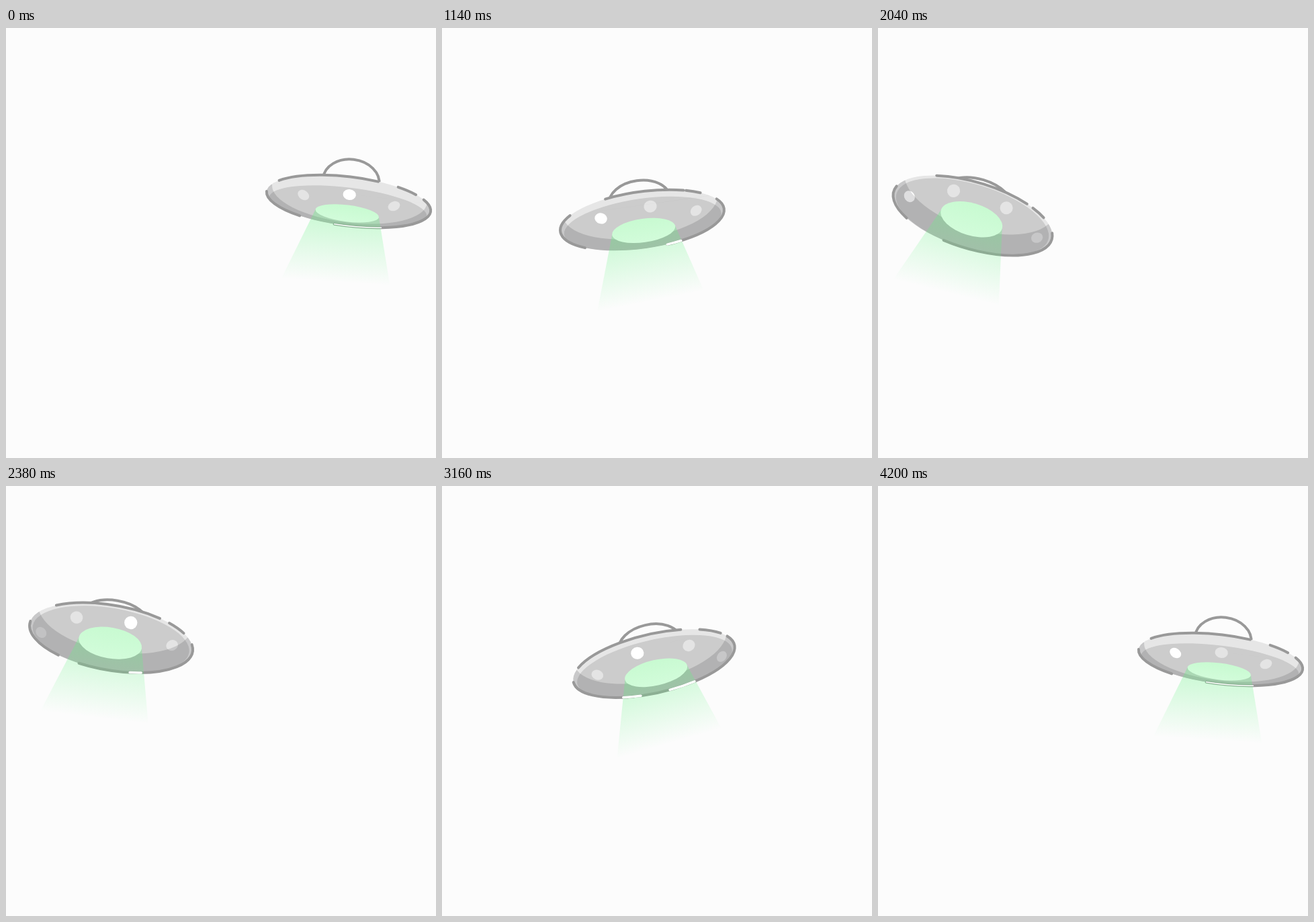
Recreate the animation shown at these times as an HTML page with a canvas. Size 640 px wide and 640 px high, loop 4220 ms.

```html
<!DOCTYPE html>
<html lang="en">
<head>
<meta charset="utf-8">
<title>Flying saucer</title>
<style>
html, body { margin: 0; width: 100%; height: 100%; overflow: hidden; background: #fcfcfc; }
canvas { display: block; width: 640px; height: 640px; }
</style>
</head>
<body>
<canvas id="stage" width="640" height="640"></canvas>
<script>
const ctx = document.getElementById('stage').getContext('2d');
const LOOP = 4220, PERIOD = 4200;   // the last frame rests on the first pose
const RX = 123, TAU = Math.PI * 2, RAD = Math.PI / 180;

// time, x, y, roll in degrees
const PATH = [
  [0, 510, 258, 7],
  [440, 428.5, 212.5, -2.5],
  [540, 408, 213, -4],
  [1080, 308, 277, -8],
  [1140, 298, 286, -8],
  [1400, 249, 310, -5],
  [1620, 208, 310, 2],
  [2040, 141, 279, 17],
  [2160, 132.5, 257, 14.5],
  [2700, 232, 211.5, 3],
  [2760, 243.5, 214.5, 1.7],
  [3240, 330, 274, -15],
  [3560, 390, 307, -18],
  [3780, 437, 304, -7]
];

// time, pitch, then rim angles: top line, short line, right line, left line, glint end
const SHAPE = [
  [0, 0, 210, 289, 305, 323, -26, 98, 124.5, 180, 98],
  [440, 0.15, 225, 294, 305, 321, -26, 89, 129, 197, 89],
  [1140, 0.45, 246, 303, 305, 318, -22, 75, 137, 211, 75],
  [2040, 1, 236, 306, 312, 326, -11, 104.5, 139, 190, 64.5],
  [2760, 0.73, 210.5, 298, 310, 331, -16, 112, 112, 180, 83.5],
  [3560, 0.38, 205, 291, 308, 328, -24, 112, 112, 180, 83]
];

const clamp = v => Math.max(0, Math.min(1, v));

// periodic cubic through the rows, one value per column
function sample(rows, time) {
  const n = rows.length, t = time % PERIOD;
  const at = i => {
    const turn = Math.floor(i / n), row = rows[i - turn * n];
    return { t: row[0] + turn * PERIOD, row };
  };
  let i = n - 1;
  while (rows[i][0] > t) i--;
  const [a, b, c, d] = [at(i - 1), at(i), at(i + 1), at(i + 2)];
  const h0 = b.t - a.t, h1 = c.t - b.t, h2 = d.t - c.t, u = (t - b.t) / h1;
  return b.row.slice(1).map((p, k) => {
    const q = c.row[k + 1];
    const s0 = (p - a.row[k + 1]) / h0, s1 = (q - p) / h1, s2 = (d.row[k + 1] - q) / h2;
    const m0 = (s0 * h1 + s1 * h0) / (h0 + h1) * h1;
    const m1 = (s1 * h2 + s2 * h1) / (h1 + h2) * h1;
    const u2 = u * u, u3 = u2 * u;
    return p * (2 * u3 - 3 * u2 + 1) + m0 * (u3 - 2 * u2 + u) +
           q * (3 * u2 - 2 * u3) + m1 * (u3 - u2);
  });
}

function oval(x, y, rx, ry, fill, tilt = 0) {
  ctx.beginPath();
  ctx.ellipse(x, y, rx, ry, tilt, 0, TAU);
  ctx.fillStyle = fill;
  ctx.fill();
}

function rimLine(from, to, ry, color, width) {
  if (to <= from) return;
  ctx.beginPath();
  ctx.ellipse(0, 0, RX, ry, 0, from * RAD, to * RAD);
  ctx.strokeStyle = color;
  ctx.lineWidth = width;
  ctx.stroke();
}

function drawDome(q, ry) {
  ctx.save();
  // only the part above the hull shows
  ctx.beginPath();
  ctx.rect(-200, -200, 400, 400);
  ctx.ellipse(0, 0, RX, ry, 0, 0, TAU);
  ctx.clip('evenodd');
  ctx.beginPath();
  ctx.ellipse(0, -30, 42 + q * 7.5, 32.7 - q * 7.5, 0, Math.PI, TAU);
  ctx.strokeStyle = '#999';
  ctx.lineWidth = 4;
  ctx.stroke();
  ctx.restore();
}

function drawLights(q, time) {
  const spin = time / PERIOD * 135;
  const lit = time < 2110 ? 0 : 2;
  const depth = 30 + 22 * q, mid = depth - 10 - 20 * q;
  for (let k = -2; k < 6; k++) {
    const deg = 45 * k - spin;
    if (Math.abs(deg) > 110) continue;
    const s = Math.sin(deg * RAD), c = Math.cos(deg * RAD);
    const reach = deg > 0 ? 0.35 * q : 0;
    ctx.globalAlpha = clamp((c - 0.15 + reach) * 10);
    oval((96 + 12 * q) * s, mid - depth * c, 9.7 - s * s, (8 + 2 * q) * (1 - 0.28 * s * s),
      k === lit ? '#fff' : '#e4e4e4', -0.7 * s);
  }
  ctx.globalAlpha = 1;
}

function drawHull(q, ry, time) {
  const rim = 16 - 12.5 * q;
  ctx.save();
  ctx.beginPath();
  ctx.ellipse(0, 0, RX, ry, 0, 0, TAU);
  ctx.clip();
  ctx.fillStyle = '#e6e6e6';
  ctx.fillRect(-130, -80, 260, 160);
  oval(0, rim / 2, 118, ry - rim / 2, '#ccc');
  drawLights(q, time);
  // shadow along the lower side
  const low = ry - 5 - 25 * q, h = ry + 6;
  ctx.beginPath();
  ctx.rect(-130, -80, 260, 160);
  ctx.ellipse(0, low - h, 116, h, 0, 0, TAU);
  ctx.rect(-130, -80, 260, 80 + low - h);
  ctx.save();
  ctx.beginPath();
  ctx.rect(-130, low - h, 260, 200);
  ctx.ellipse(0, low - h, 116, h, 0, 0, Math.PI);
  ctx.clip('evenodd');
  ctx.fillStyle = 'rgba(0,0,10,.13)';
  ctx.fillRect(-130, -80, 260, 160);
  ctx.restore();
  ctx.restore();
}

function drawBeam(q) {
  const y = 18 - 12 * q * q;
  const glow = ctx.createLinearGradient(0, y, 6, 121);
  glow.addColorStop(0, 'rgba(100,242,130,.34)');
  glow.addColorStop(1, 'rgba(100,242,130,0)');
  ctx.beginPath();
  ctx.moveTo(-47.5, y);
  ctx.lineTo(47.5, y);
  ctx.lineTo(76, 116);
  ctx.lineTo(-85, 125);
  ctx.fillStyle = glow;
  ctx.fill();
  const h = 12.4 + 11.6 * q;
  const port = ctx.createLinearGradient(0, y - h, 0, y + h);
  port.addColorStop(0, '#c8fad1');
  port.addColorStop(1, '#d2fcda');
  oval(0, y, 47.5, h, port);
}

function draw(time) {
  const [x, y, roll] = sample(PATH, time);
  const [pitch, a0, a1, b0, b1, c0, c1, d0, d1, glint] = sample(SHAPE, time);
  const q = clamp(pitch), ry = 36.5 + 13 * q;

  ctx.fillStyle = '#fcfcfc';
  ctx.fillRect(0, 0, 640, 640);
  ctx.save();
  ctx.translate(x, y);
  ctx.rotate(roll * RAD);
  ctx.lineCap = 'round';
  drawDome(q, ry);
  drawHull(q, ry, time);
  for (const [from, to] of [[a0, a1], [b0, b1], [c0, c1], [d0, d1]]) {
    rimLine(from, to, ry, '#999', 4);
  }
  drawBeam(q);
  // white glints where the beam crosses the rim
  if (glint > 66) rimLine(64.5, glint, ry, '#fff', 1.5 + Math.min(2, q * 14));
  if (d0 < 116) rimLine(117 - Math.min(13, (117 - d0) * 2.6), 117, ry, '#fff', 3.5);
  ctx.restore();
}

function tick() {
  const t = performance.now() % LOOP;
  draw(Math.min(PERIOD, Math.floor(t / 20) * 20));
  requestAnimationFrame(tick);
}
tick();
</script>
</body>
</html>
```
